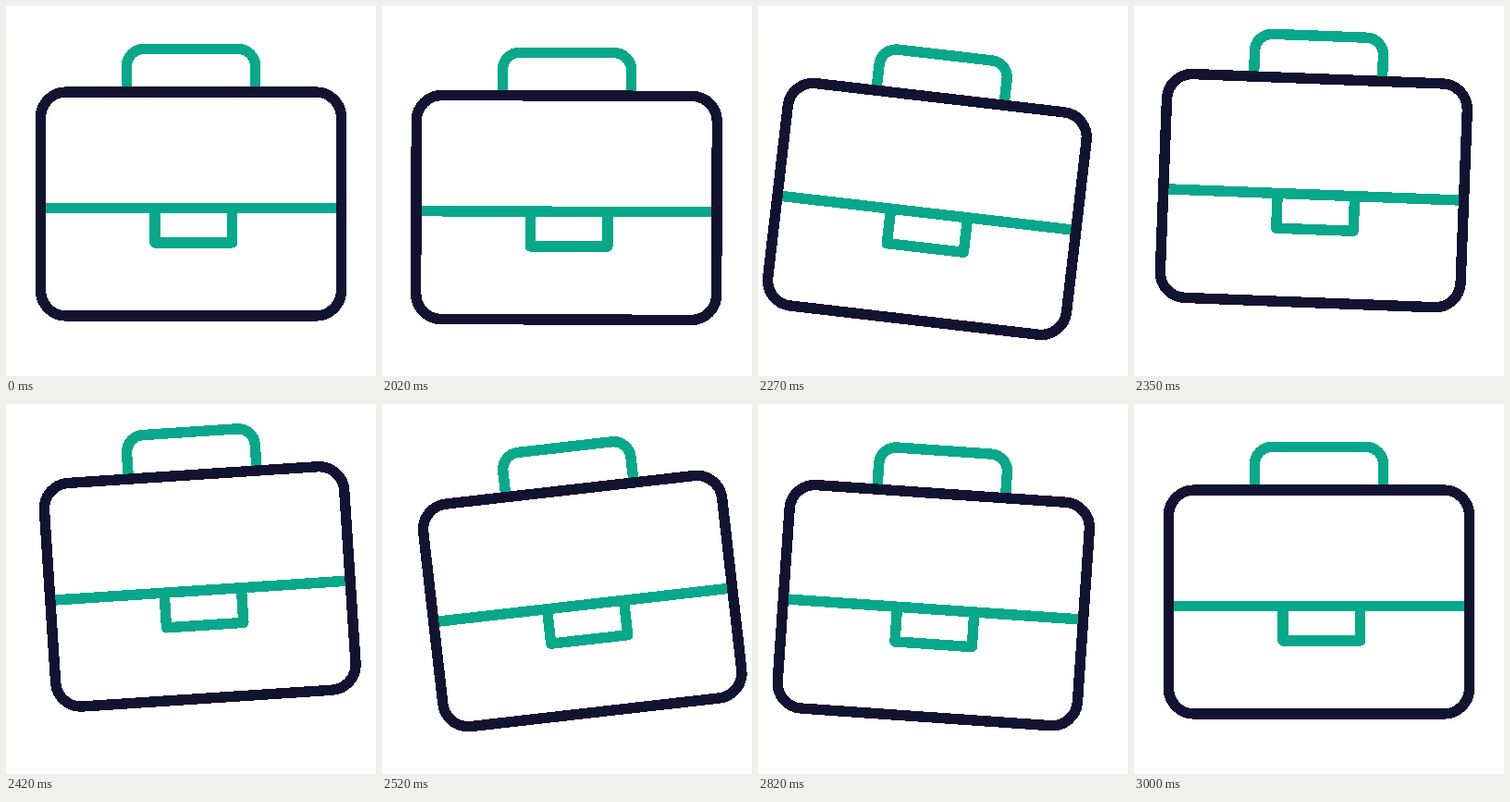
An HTML page for the animation above (3.02 s loop, 400 by 400 pixels).

```html
<!DOCTYPE html>
<html lang="en">
<head>
<meta charset="utf-8">
<title>Briefcase</title>
<style>
  html, body { margin: 0; width: 100%; height: 100%; overflow: hidden; background: #fff; }
  svg { display: block; width: 100vw; height: 100vh; }
  g { fill: none; stroke: #08a88a; stroke-width: 11.4; stroke-linejoin: round; shape-rendering: crispEdges; }
  rect { stroke: #121331; }
</style>
</head>
<body>
<svg viewBox="0 0 400 400">
  <g id="case">
    <path d="M130.5 93V65a18.5 18.5 0 0 1 18.5-18.5H251a18.5 18.5 0 0 1 18.5 18.5V93"/>
    <path d="M38 218.3H362M161 218.3V256H244.5V218.3"/>
    <rect x="37.5" y="93" width="325" height="242" rx="27.5"/>
  </g>
</svg>
<script>
  const LOOP = 3020, REST = 2000, STEP = 25;
  const ANGLES = [0, 7, -6.8, 5, 0], HEIGHTS = [0, 41, -18, 16, 0];

  // Eases from one extreme to the next, one per beat
  function sway(extremes, beat) {
    const b = Math.min(Math.max(beat, 0), extremes.length - 1);
    const i = Math.floor(b), x = b - i;
    const from = extremes[i], to = extremes[i + 1] ?? from;
    return from + (to - from) * x * x * (3 - 2 * x);
  }

  const bag = document.getElementById('case');
  const start = performance.now();

  function draw() {
    const now = (performance.now() - start) % LOOP;
    const t = Math.floor((now + 5) / STEP) * STEP - REST;
    const angle = sway(ANGLES, t / 250.5);
    // The first drop takes half a beat
    const drop = sway(HEIGHTS, Math.min(t / 130, t / 260 + 0.5));
    bag.setAttribute('transform', `translate(0 ${drop}) rotate(${angle} 200 66)`);
    requestAnimationFrame(draw);
  }
  draw();
</script>
</body>
</html>
```
